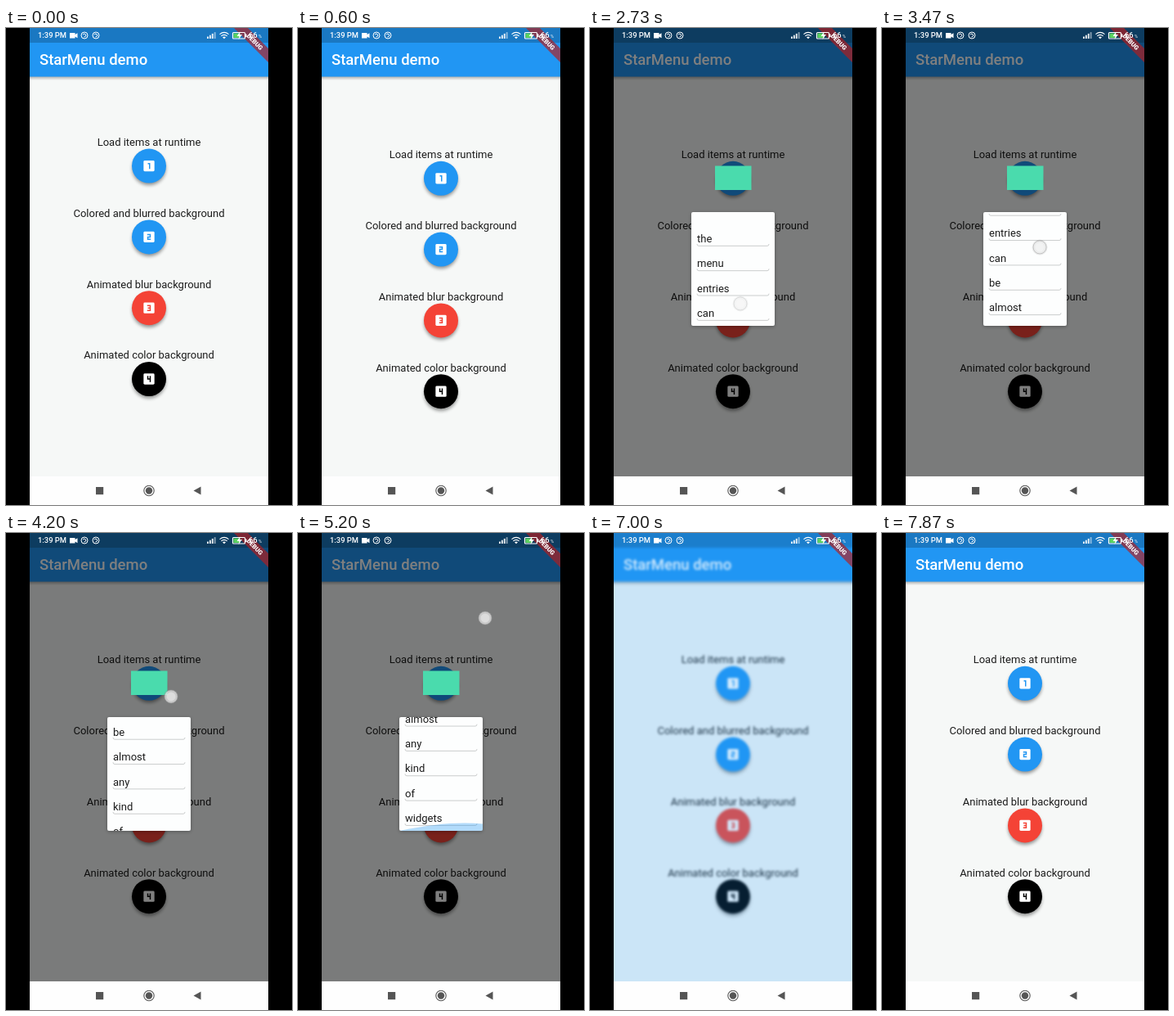
These frames come from a looping animation (350 by 583 pixels, 8000 ms). An HTML page:

```html
<!DOCTYPE html>
<html lang="en">
<head>
<meta charset="utf-8">
<title>StarMenu demo</title>
<style>
  html, body { margin: 0; width: 100%; height: 100%; overflow: hidden; background: #000; }
  svg { display: block; width: 100vw; height: 100vh; font-family: Roboto, "Open Sans", sans-serif; }
</style>
</head>
<body>
<svg viewBox="0 0 350 583">
  <defs>
    <clipPath id="screen"><rect x="29" width="292" height="548"/></clipPath>
    <clipPath id="cardClip"><rect x="124" y="225" width="102" height="139" rx="2"/></clipPath>
    <linearGradient id="barShade" x2="0" y2="1">
      <stop stop-color="#000" stop-opacity=".3"/>
      <stop offset="1" stop-color="#000" stop-opacity="0"/>
    </linearGradient>
    <filter id="soft" x="-30%" y="-30%" width="160%" height="160%">
      <feGaussianBlur stdDeviation="2"/>
    </filter>
  </defs>
  <rect width="350" height="583"/>

  <g clip-path="url(#screen)">
    <g id="app">
      <rect x="19" y="-10" width="312" height="570" fill="#f6f8f7"/>
      <g id="buttons"></g>
      <rect x="19" y="59" width="312" height="5" fill="url(#barShade)"/>
      <rect x="19" y="-10" width="312" height="69.5" fill="#2196f3"/>
      <rect x="19" y="-10" width="312" height="28" fill="#1a78c2"/>
      <text x="41" y="45" font-size="18.5" font-weight="500" fill="#fff">StarMenu demo</text>
    </g>
    <rect id="veil" x="29" width="292" height="548"/>

    <g id="menu">
      <g id="card">
        <rect x="124" y="226" width="102" height="139" rx="2" opacity=".3" filter="url(#soft)"/>
        <rect x="124" y="225" width="102" height="139" rx="2" fill="#fdfefe"/>
        <g clip-path="url(#cardClip)">
          <g id="rows" font-size="13" fill="#1c1c1c"></g>
          <path id="glow" fill="#2196f3" fill-opacity=".34"/>
        </g>
      </g>
      <rect id="tile" x="153" y="168.5" width="44.5" height="29.5" fill="#4adbad"/>
    </g>

    <path d="M279 0H296L321 25V42Z" fill="#b71c1c" fill-opacity=".66"/>
    <text transform="translate(304.5 17) rotate(45)" y="2.7" text-anchor="middle" font-size="7.6" font-weight="900" fill="#fff">DEBUG</text>

    <g id="status" fill="#fff">
      <text x="39" y="12.4" font-size="9.4" font-weight="500">1:39 PM</text>
      <path d="M78 6h6.5v2l3-1.8v6l-3-1.8v2H78z"/>
      <g id="dials" fill="none" stroke="#fff"></g>
      <g id="bars"></g>
      <g fill="none" stroke="#fff" stroke-width="1.2">
        <path d="M261.5 7.6q5.500-4.400 11 0M263.400 9.700q3.600-2.800 7.200 0"/>
        <rect x="277.500" y="5.500" width="15" height="7.500" rx="1"/>
      </g>
      <path d="M265 11.200q2-1.500 4 0l-2 2z"/>
      <rect x="278.500" y="6.500" width="8" height="5.500" fill="#5bd35f"/>
      <path d="M286.500 4.500l-4 5.500h3l-1 4 4.500-6h-3z"/>
      <rect x="293" y="7.500" width="1.500" height="3.500"/>
      <text x="297" y="12.400" font-size="9.400" font-weight="500">66</text>
      <text x="309" y="12.200" font-size="5.500">%</text>
    </g>
    <g id="touch">
      <circle r="9.500" fill="#888" fill-opacity=".16"/>
      <circle r="8" fill="#eee" fill-opacity=".68" stroke="#999" stroke-opacity=".5"/>
      <circle r="5.500" fill="#fff" fill-opacity=".35"/>
    </g>
  </g>

  <rect x="29" y="548" width="292" height="35" fill="#fefefe"/>
  <g fill="#555">
    <rect x="110" y="561" width="9.200" height="9.200"/>
    <circle cx="175" cy="565.500" r="6.200" fill="none" stroke="#555" stroke-width="1.100"/>
    <circle cx="175" cy="565.500" r="4.200"/>
    <path d="M238.500 560.500v10l-9-5z"/>
  </g>
</svg>

<script>
const LOOP = 8000, OPEN = 1470, CLOSE = 5330, CLOSED = 5730;
const ROW_GAP = 30.35, MAX_SCROLL = 182, SHIFT = 15.2;
const $ = id => document.getElementById(id);
const clamp = (v, lo = 0, hi = 1) => Math.min(hi, Math.max(lo, v));
const span = (t, from, to) => clamp((t - from) / (to - from));
const easeOut = p => 1 - (1 - p) ** 3;
const pulse = (t, a, b, c, d) => Math.min(span(t, a, b), 1 - span(t, c, d));

const entries = [
  ["Load items at runtime", "#2196f3", "M10 8h3v9"],
  ["Colored and blurred background", "#2196f3", "M9 8h5v4h-4v4h5"],
  ["Animated blur background", "#f44336", "M9 8h5v8H9M10 12h4"],
  ["Animated color background", "#000", "M10 7v5h4M14 7v10"]
];
$("buttons").innerHTML = entries.map(([label, color, digit], i) => `
  <g transform="translate(175 ${168.6 + i * 86.8})">
    <text y="-24.600" text-anchor="middle" font-size="13" fill="#1c1c1c">${label}</text>
    <circle cy="3" r="20.500" opacity=".42" filter="url(#soft)"/>
    <circle r="21" fill="${color}"/>
    <g transform="scale(.74) translate(-12 -12)">
      <rect x="3" y="3" width="18" height="18" rx="2" fill="#fff"/>
      <path d="${digit}" fill="none" stroke="${color}" stroke-width="2"/>
    </g>
  </g>`).join("");

$("rows").innerHTML = "the menu entries can be almost any kind of widgets".split(" ").map((word, i) => `
  <g transform="translate(131 ${262 + i * ROW_GAP})">
    <text>${word}</text>
    <path d="M0 2q0 2.300 2 2.300h84q2 0 2-2.300" fill="none" stroke="#c6c8c8" stroke-width=".9"/>
  </g>`).join("");

$("dials").innerHTML = [96, 110].map(x => `
  <circle cx="${x}" cy="9" r="4"/>
  <path d="M${x - 2} 8q2-2 3.500 0t-2 3"/>`).join("");

$("bars").innerHTML = [0, 1, 2, 3].map(i =>
  `<rect x="${246 + i * 2.9}" y="${10.5 - i * 1.8}" width="1.900" height="${2.5 + i * 1.8}" opacity="${i < 3 ? .9 : .5}"/>`).join("");

// time, x, y of the finger while it drags the list
const drag = [[2730, 184, 337], [4200, 202, 200], [5200, 229, 104], [5330, 232, 92]];

function dragPoint(t) {
  const i = t < drag[1][0] ? 0 : t < drag[2][0] ? 1 : 2;
  const [a, b] = [drag[i], drag[i + 1]];
  const p = span(t, a[0], b[0]);
  return [a[1] + (b[1] - a[1]) * p, a[2] + (b[2] - a[2]) * p];
}

function placeItem(el, y, p, opacity) {
  const scale = .47 + .53 * p;
  const cy = 184 + (y - 184) * p;
  el.setAttribute("transform", `translate(175 ${cy}) scale(${scale}) translate(-175 ${-y})`);
  el.setAttribute("opacity", opacity);
}

function drawMenu(t, fingerY) {
  const shown = t >= OPEN && t < CLOSED;
  $("menu").style.display = shown ? "" : "none";
  if (!shown) return;
  const back = 1 - span(t, CLOSE, CLOSED) ** 2;
  const cardP = easeOut(span(t, OPEN, 2270)) * back;
  const tileP = easeOut(span(t, OPEN, 2470)) * back;
  placeItem($("card"), 294.5, cardP, .06 + .94 * cardP);
  placeItem($("tile"), 183.3, tileP, .5 + .5 * tileP);

  const pull = 337 - fingerY - 1.6;
  $("rows").setAttribute("transform", `translate(0 ${-clamp(pull, 0, MAX_SCROLL)})`);
  const h = clamp((pull - MAX_SCROLL) / 50, 0, 1.2) * back;
  $("glow").setAttribute("d", `M124 364Q185 ${364 - 13 * h} 226 ${364 - 8.5 * h}V364Z`);
}

function drawTouch(t, dragged) {
  const dragging = t >= 2600 && t < 5450;
  const [x, y] = dragging ? dragged : [181, t < 2600 ? 185 : 271];
  const opacity = dragging ? pulse(t, 2690, 2760, CLOSE, 5430)
    : t < 2600 ? pulse(t, 900, 960, 1050, 1130)
    : .75 * pulse(t, 6070, 6150, 6270, 6400);
  $("touch").setAttribute("transform", `translate(${x} ${y})`);
  $("touch").setAttribute("opacity", opacity);
}

function drawVeil(t) {
  const dark = t >= OPEN && t < CLOSED;
  const blue = t >= 6200 && t < 7470;
  $("veil").setAttribute("fill", dark ? "#000" : "#2196f3");
  $("veil").setAttribute("opacity", dark ? .5 : blue ? .2 : 0);
  const blur = blue ? 1.6 * span(t, 6290, 6600) * (1 - span(t, 7250, 7470)) : 0;
  $("app").style.filter = blur ? `blur(${blur}px)` : "none";
}

function draw(t) {
  const finger = dragPoint(t);
  $("buttons").setAttribute("transform", `translate(0 ${SHIFT * easeOut(span(t, 70, 600))})`);
  drawVeil(t);
  drawMenu(t, finger[1]);
  drawTouch(t, finger);
}

const start = performance.now();
function tick() {
  draw((performance.now() - start) % LOOP);
  requestAnimationFrame(tick);
}
tick();
</script>
</body>
</html>
```
